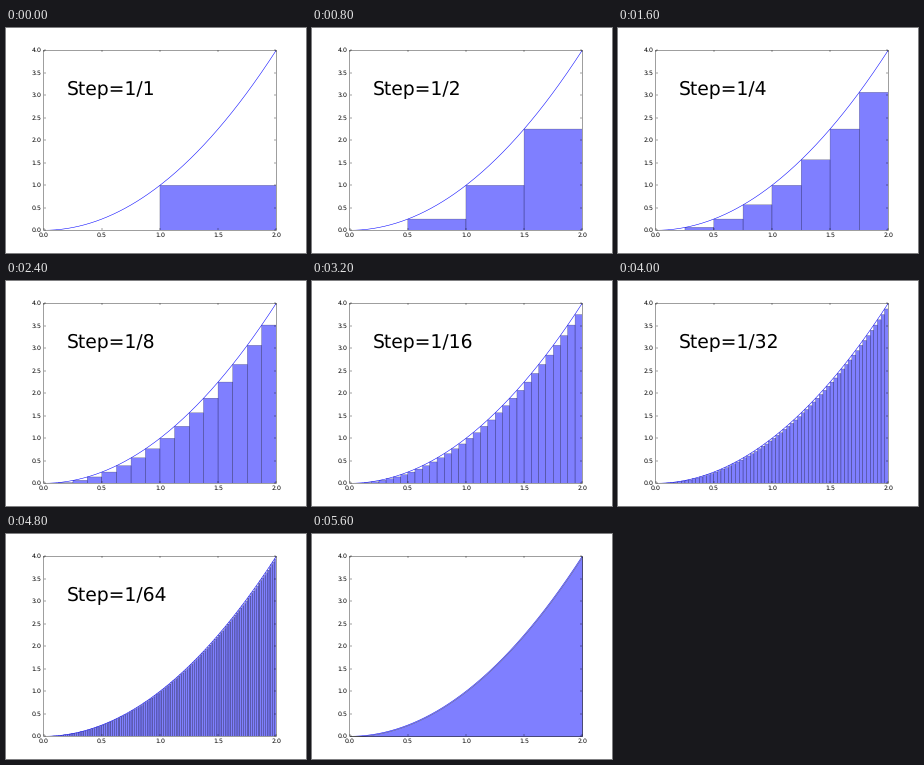
These frames come from a looping animation (300x225 px, 6400 ms). A matplotlib script:

```python
import numpy as np
import matplotlib.pyplot as plt
from matplotlib.animation import FuncAnimation

# The plot is laid out on an 800x600 grid and shown at 300x225.
GRID_W, GRID_H = 800, 600
AX_W, AX_H = 620, 480
X_MAX, Y_MAX = 2.0, 4.0
HAIRLINE = 0.72  # one grid cell, in points
LEVELS = 7
HOLD = 800

plt.rcParams.update({
    "font.family": "DejaVu Sans",
    "font.size": 12,
    "text.hinting": "none",
    "path.snap": False,
    "axes.linewidth": HAIRLINE,
    "ytick.alignment": "center",
})

fig = plt.figure(figsize=(8, 6), dpi=37.5, facecolor="white")
ax = fig.add_axes([100.5 / GRID_W, 60.5 / GRID_H, AX_W / GRID_W, AX_H / GRID_H])
ax.set_xlim(0, X_MAX)
ax.set_ylim(0, Y_MAX)
ax.set_xticks(np.arange(0, 2.1, 0.5))
ax.set_yticks(np.arange(0, 4.1, 0.5))
ax.xaxis.set_major_formatter("{x:.1f}")
ax.yaxis.set_major_formatter("{x:.1f}")
ax.tick_params(direction="in", length=4, width=HAIRLINE, pad=4,
               top=True, right=True)

curve_x = np.linspace(0, X_MAX, 201)
ax.plot(curve_x, curve_x ** 2, color="b", linewidth=1)
label = ax.text(0.2, 3.0, "", fontsize=36)
area = []


def snap(values, span, cells):
    """Round data values to whole grid cells."""
    return np.floor(values * cells / span + 0.5) * span / cells


def draw_bars(parts):
    edges = np.arange(2 * parts + 1) / parts
    left = snap(edges, X_MAX, AX_W)
    height = snap(edges[:-1] ** 2, Y_MAX, AX_H)
    return ax.bar(left[:-1], height, np.diff(left), align="edge", color="b",
                  edgecolor="k", linewidth=HAIRLINE, alpha=0.5)


def draw_area():
    return ax.fill_between(curve_x, curve_x ** 2, facecolor="b",
                           edgecolor="k", linewidth=1, alpha=0.5)


def update(i):
    while area:
        area.pop().remove()
    if i < LEVELS:
        parts = 2 ** i
        label.set_text(f"Step=1/{parts}")
        area.append(draw_bars(parts))
    else:
        label.set_text("")
        area.append(draw_area())
    return [label]


anim = FuncAnimation(fig, update, frames=LEVELS + 1, init_func=lambda: update(0),
                     interval=HOLD, repeat=True, repeat_delay=0, blit=False)
plt.show()
```
